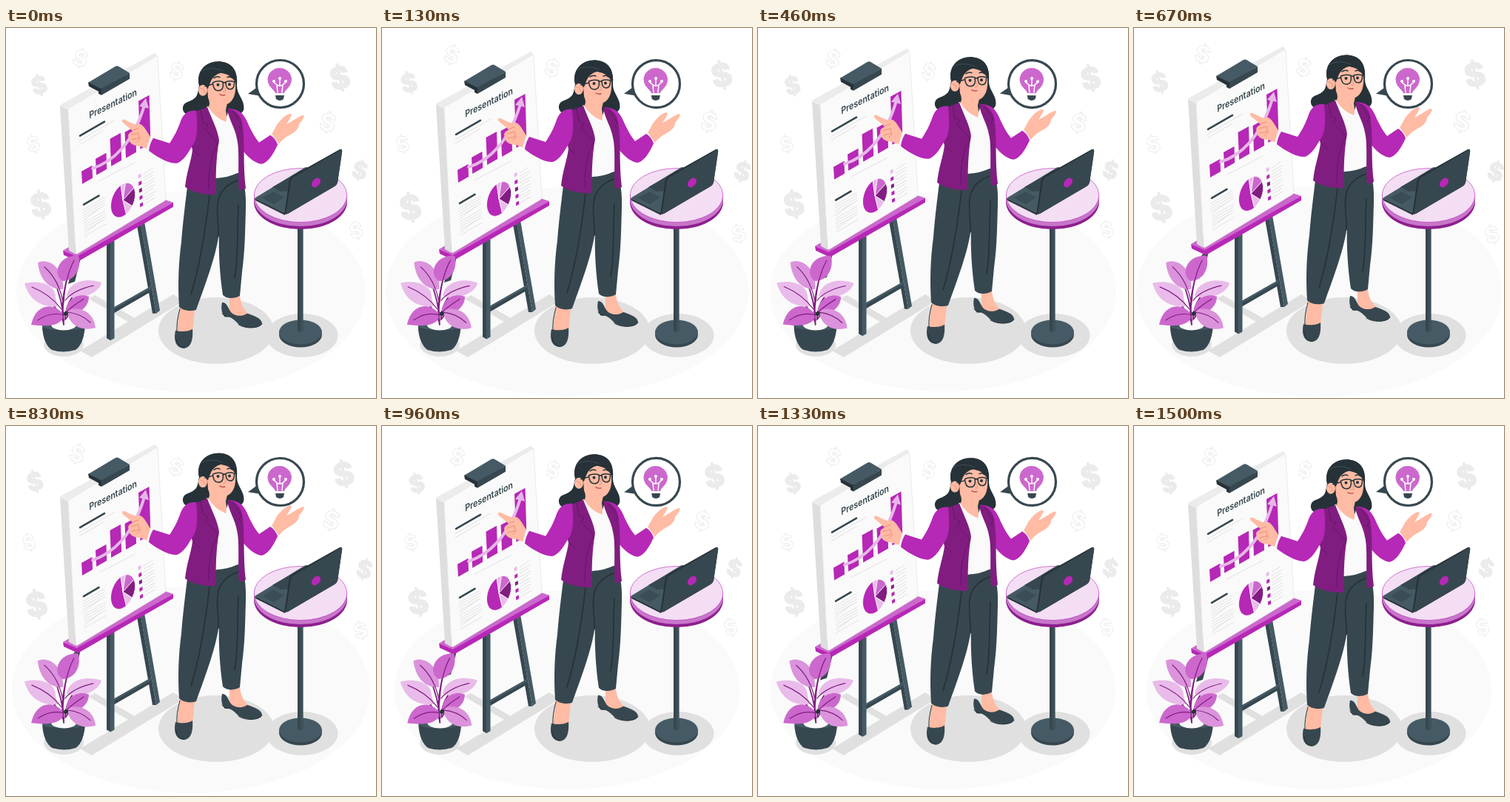
These frames come from a looping animation (500 by 500 pixels, 1540 ms). An HTML page:

```html
<!DOCTYPE html>
<html lang="en">
<head>
<meta charset="utf-8">
<title>Presentation</title>
<style>
html, body { margin: 0; height: 100%; overflow: hidden; background: #fff; }
svg { display: block; width: 500px; height: 500px; }
.p { fill: #b628b6 } .dp { fill: #811d81 } .mp { fill: #cc68cd } .lp { fill: #db93dc } .xp { fill: #e9bbea }
.d { fill: #37474f } .m { fill: #455a64 } .k { fill: #263238 } .skin { fill: #ffbba4 } .sh { fill: #e0e0e0 }
.line { fill: none; stroke-linecap: round; stroke-linejoin: round }
.vein { stroke: #811d81 }
.ink { stroke: #263238; stroke-width: 1.5 }
.fold { stroke: #5f135f; stroke-width: .8 }
.fine { stroke: #dedede; stroke-width: .9 }
#coins { font: 800 30px Inter, sans-serif; text-anchor: middle }
</style>
</head>
<body>
<svg viewBox="0 0 500 500">
  <ellipse id="floor" cx="250" cy="356.500" rx="233.500" ry="134.500" fill="#fafafa"/>
  <g id="coins"></g>

  <g id="shadows" class="sh">
    <ellipse cx="284" cy="409" rx="78" ry="45"/>
    <ellipse cx="400" cy="415.500" rx="48.500" ry="29.500"/>
    <ellipse cx="78" cy="428" rx="27" ry="16"/>
    <path d="M100 436 226 360 240 369 116 445Z"/>
    <path d="M112 366 120 361 186 399 177 404Z"/>
  </g>

  <g id="easel">
    <path class="d" d="M92 315 101 311 93 343 84 346Z"/>
    <path class="d" d="M177 267 182 264 203 386 198 386Z"/>
    <path class="m" d="M182 265 187 262 208 382 203 386Z"/>
    <path class="m" d="M145 378 196 349 197 353 145 382Z"/>
    <path class="d" d="M145 381 197 352 197 356 145 386Z"/>
    <path class="d" d="M136 288H141.500V422.500L136 419.500Z"/>
    <path class="m" d="M141 288H146.500V419.500L141 422.500Z"/>

    <path class="p" d="M77 301 97 309V316L78 307Z"/>
    <path class="mp" d="M77 301 92 292 214 232 226 236 97 310Z"/>
    <path class="p" d="M96 309 226 236V242L97 316Z"/>

    <path d="M73 107Q72 105 75 103L199 35Q203 33 204 37L206 42 84 112Z" fill="#ececec"/>
    <path d="M73 106 84 111 94 306 85 301Z" fill="#dedede"/>
    <path d="M84 113Q83 110 86 108L202 39Q205 37 205 41L216 231Q216 233 214 234L97 305Q94 307 94 303Z" fill="#fafafa" stroke="#e2e2e2" stroke-width=".7"/>

    <path class="m" d="M111 74 148 52Q150 51 152 52L167 61 129 83Z"/>
    <path class="d" d="M129 82 167 61V69L129 91Z"/>
    <path class="k" d="M111 73.500 129 82.500V91L125 89V86L112 79Z"/>

    <text transform="matrix(.81 -.405 .04 1 112.500 123)" font-family="Inter, sans-serif" font-size="13" font-weight="600" fill="#37474f">Presentation</text>
    <path class="line" d="M100 146 133 127M105 239 125.500 227" stroke="#37474f" stroke-width="2.600"/>
    <path id="rules" class="line fine"/>
    <g id="bars" class="p"></g>
    <path class="line" d="M117 190C145 181 171 156 186 108" stroke="#e7b6e8" stroke-width="4"/>
    <path d="M189 95 193 109 180 106Z" fill="#e7b6e8"/>
    <g id="pie" transform="translate(158 233) matrix(16.500 -8 0 22 0 0)" stroke="#fff" stroke-width=".035"></g>
    <g id="legend"></g>
  </g>

  <g id="woman">
    <path class="k" d="M261 78C256 54 276 43 292 46C307 48 314 61 312 78C312 91 322 96 321.500 109C320 119 308 117 302 124L262 121C254 127 246 124 245 117C238 115 237 106 242 102C249 98 257 97 259 88Z"/>
    <path class="skin" d="M235 378 255 381 252 412 231 412Z"/>
    <path class="d" d="M229 409C226 423 230 433 241 433C251 432 253 419 252 407C247 411 234 411 229 409Z"/>
    <path class="skin" d="M302 364 316 361C317 374 321 380 328 387C319 393 308 391 302 383Z"/>
    <path class="d" d="M292 371C290 380 292 387 296 391C304 389 308 395 315 401C326 408 345 406 346 399C345 392 333 388 326 386C319 391 308 390 303 383C299 376 298 371 292 371Z"/>
    <path class="line" d="M231 410Q230 398 235 380M292 386Q297 392 301 390M314 401C325 408 343 406 346 400M230 420Q232 432 241 432.500" stroke="#263238" stroke-width="1"/>
    <path class="d" d="M245 215 285 203 314 196C322 203 325 224 324 246C323 278 323 300 319 330L316 362C308 367 297 366 293 361C289 335 287 304 288 276C285 305 270 345 257 381C249 384 239 382 234 377C232 349 233 318 237 289C239 263 242 240 245 215Z"/>
    <path class="line" d="M314 206C302 210 291 218 287 232C283 250 288 266 287 282M275 226C270 270 263 318 250 360M314 240C312 280 314 310 309 338" stroke="#263238" stroke-width="1.700"/>

    <path class="skin" d="M357 147C362 140 365 130 372 124C378 118 385 114 386 118C384 123 381 127 379 130C388 126 395 120 401 118C405 118 401 125 396 130C396 137 389 142 383 145C376 149 371 153 367 160Z"/>
    <path d="M356 146 359 143 369 157 366 161Z" fill="#f3f3f3"/>
    <path class="p" d="M301 109C314 110 320 114 326 127C331 139 337 149 342 155L357 145Q364 149 367 158C361 172 353 183 345 184C332 182 319 167 312 153Z"/>
    <path d="M271 106 279 110Q287 127 297 123L301 111 313 137 315 195Q300 203 283 203L275 150Z" fill="#fafafa"/>
    <path class="skin" d="M273 94 299 102 297 111Q299 122 297 128Q283 122 273 107Q277 104 273 94Z"/>
    <path d="M272 106Q281 121 297 127L299 140 276 124Z" fill="#fafafa"/>
    <path class="dp" d="M254 114 272 107C277 121 286 137 288 152C284 174 283 201 284 225C268 226 251 222 242 215C244 195 250 181 252 165C247 149 247 129 254 114Z"/>
    <path class="dp" d="M299 109C310 110 319 118 320 134C323 160 320 185 324 217L315 220C313 194 316 165 312 150C310 136 300 122 299 109Z"/>
    <path class="line fold" d="M263 111 266 128 273 131 269 137 287 156M306 112 318 130 315 135 319 139M286 156Q273 179 274 218M254 166 261 173"/>
    <path class="skin" d="M197 150C191 142 187 132 181 130C174 132 169 128 160 124C156 123 156 127 159 129L172 140C166 141 163 146 167 150C165 156 174 160 181 160L192 164Z"/>
    <path class="line" d="M170 139 179 136M169 145 179 142 180 149 170 151M177 154 182 149" stroke="#e78f79" stroke-width="1"/>
    <path d="M195 147 199 150 194 166 190 163Z" fill="#f3f3f3"/>
    <path class="p" d="M257 112C246 111 240 116 236 126C232 138 226 149 221 156L199 149Q194 157 193 166C206 176 221 184 231 183C241 180 249 164 255 154C260 142 258 124 257 112Z"/>

    <path class="skin" d="M271 68C281 56 307 59 310 75C311 88 308 99 299 103C289 106 277 103 273 94Z"/>
    <path class="k" d="M261 78C256 55 275 43 292 46C307 48 314 60 311 77C308 68 302 63 291 61C285 62 279 66 276 74L273 82 265 80Z"/>
    <ellipse class="skin" cx="266" cy="84.500" rx="6" ry="7.500"/>
    <path class="line" d="M263 82Q268 82 268.500 88" stroke="#e78f79"/>
    <path class="line" d="M263 59Q276 51 293 58" stroke="#455a64" stroke-width=".7"/>
    <path class="line ink" d="M279.500 74Q286 71 293 73Q295 85 287 85Q280 85 279.500 74ZM297 73Q303 71 308.500 73Q309 83 303 83Q297 83 297 73ZM293 75Q295 73 297 75M279.500 76 269 79"/>
    <path class="line ink" d="M281 68Q285 65 289 67M299 67Q303 65 306 68"/>
    <g class="k"><circle cx="286.500" cy="77" r="2"/><circle cx="302" cy="76.500" r="2"/></g>
    <path class="line" d="M295 78 297 85Q296 87 293 86" stroke="#e78f79"/>
    <path class="line" d="M289 90Q292 92 296 91" stroke="#b94c4c" stroke-width="1.400"/>
  </g>

  <g id="plant">
    <path class="d" d="M49 402C49 418 55 431 62 435Q78 440 94 435C102 430 106 417 107 402Z"/>
    <ellipse class="m" cx="78" cy="402.500" rx="29" ry="6"/>
    <ellipse cx="78" cy="401" rx="17" ry="7.500" fill="#fafafa"/>
    <path class="line vein" d="M78 401C73 376 79 352 85 327M78 396Q77 370 64 338M78 398Q68 374 48 360M80 392Q82 361 108 350M80 394Q88 382 98 372" stroke-width="1.800"/>
    <path class="lp" d="M77 353C57 354 45 338 43 317C58 310 79 325 77 353Z"/>
    <path class="mp" d="M77 342C65 336 68 318 81 311Q92 306 98 308C102 324 94 341 77 342Z"/>
    <path class="xp" d="M70 376C47 378 31 367 25 345C46 340 68 347 67 365Z"/>
    <path class="xp" d="M82 362C84 345 105 336 129 344C126 359 99 369 82 362Z"/>
    <path class="mp" d="M81 384C81 366 98 357 112 363C112 377 98 389 81 384Z"/>
    <path class="mp" d="M79 389C66 369 40 372 34 401C52 403 72 405 79 389Z"/>
    <path class="lp" d="M82 381C101 376 118 383 121 405C104 410 85 404 82 381Z"/>
    <path class="line vein" d="M78 371Q80 336 92 314M77 371Q72 341 52 323M75 380Q60 360 35 350M80 368Q91 354 118 348M81 384Q92 374 105 366M79 388Q60 383 43 395M83 384Q102 386 114 398M78 400Q76 382 78 370" stroke-width="1.200"/>
    <circle class="k" cx="81" cy="386" r="3"/>
  </g>

  <g id="table">
    <ellipse class="d" cx="398" cy="414.500" rx="29" ry="17"/>
    <ellipse class="m" cx="398" cy="411" rx="29" ry="16.500"/>
    <path class="d" d="M394 264H401.500V409Q398 412 394 409Z"/>
    <path class="m" d="M398 264H401.500V409L398 410Z" opacity=".5"/>
    <path d="M335 226V235A63 37 0 0 0 461 235V226Z" fill="#8d1f8e"/>
    <path d="M335 226V231A63 37 0 0 0 461 231V226Z" fill="#c876ca"/>
    <ellipse cx="398" cy="226" rx="62.800" ry="36.500" fill="#f3def4" stroke="#b628b6" stroke-width=".6"/>
    <path class="k" d="M336 230 377 250V253L337 233Z"/>
    <path class="m" d="M336 230 403 189Q406 187 409 189L430 202 377 251Z"/>
    <path class="d" d="M360 215 404 190 412 194 384 220 371 221Z"/>
    <path class="k" d="M346 230 361 221 376 229 362 238Z" opacity=".3"/>
    <path class="k" d="M376 252 383 205Q384 202 387 200L451 164Q455 163 454 168L448 209Q447 212 444 214L381 251Z"/>
    <path class="d" d="M378 252 385 206Q386 203 388 202L452 165Q455 164 454 168L448 209Q447 212 444 214Z"/>
    <ellipse class="p" cx="419" cy="209" rx="7.200" ry="5" transform="rotate(-48 419 209)"/>
  </g>

  <g id="bubble">
    <path class="d" d="M327 89 341 79 345 92Z"/>
    <circle cx="370.500" cy="75.500" r="32" fill="#fff" stroke="#37474f" stroke-width="3.200"/>
    <path class="mp" d="M364 88C363 83 353.500 80 353.500 69A16.300 16.300 0 0 1 386 69C386 80 377 83 376 88Z"/>
    <path class="line" d="M367 87 366 77 362 73M373 87 374 77 378 73M366 77Q370 79 374 77M370 77V70" stroke="#fff" stroke-width="1.500"/>
    <g fill="#fff"><circle cx="362" cy="72" r="2"/><circle cx="370" cy="68" r="2"/><circle cx="378" cy="72" r="2"/></g>
    <path class="d" d="M364 91H376L375 96Q370 100 365 96Z"/>
  </g>
</svg>
<script>
const $ = id => document.getElementById(id);

// x, y, size, tilt, outlined
const coins = [
  [47, 78, 33, -14, 0], [49, 238, 44, -10, 0], [449, 68, 42, -12, 0], [476, 192, 32, 14, 0],
  [102, 42, 30, 14, 1], [39, 157, 27, -14, 1], [231, 59, 29, 14, 1], [433, 128, 33, 12, 1], [471, 272, 28, -14, 1]
];
$('coins').innerHTML = coins.map(([x, y, size, tilt, outlined]) =>
  `<text transform="translate(${x} ${y}) rotate(${tilt}) scale(${size / 31})" y="10.800" stroke="#ebebeb" fill="${outlined ? '#fff' : '#ebebeb'}">$</text>`).join('');

// left x, top y, bottom y
const bars = [[102, 194, 211], [121, 177, 199], [140.5, 150, 187], [160.5, 141, 176], [179, 99, 164]];
$('bars').innerHTML = bars.map(([x, top, bottom]) =>
  `<path d="M${x} ${top}l14.500-8 ${(bottom - top) * .03} ${bottom - top}-14 8Z"/>`).join('');

let rules = 'M99 153 147 125M99 158 133 138M126 207 174 182';
for (let i = 0; i < 11; i++) rules += `M${104 + i * .2} ${246 + i * 3.6}l${i % 5 == 4 ? 22 : 29}-17`;
for (let i = 0; i < 10; i++) rules += `M${186 + i * .2} ${198 + i * 4.4}l${i % 2 ? 14 : 12}-8`;
$('rules').setAttribute('d', rules);

const slices = [['p', 74, 260], ['xp', 260, 282], ['mp', 282, 335], ['dp', 335, 400], ['xp', 40, 74]];
const rim = deg => `${Math.cos(deg * Math.PI / 180)} ${Math.sin(deg * Math.PI / 180)}`;
$('pie').innerHTML = slices.map(([tone, from, to]) =>
  `<path class="${tone}" d="M0 0L${rim(from)}A1 1 0 ${+(to - from > 180)} 1 ${rim(to)}Z"/>`).join('');

$('legend').innerHTML = ['xp', 'p', 'dp', 'p', 'p'].map((tone, i) =>
  `<path class="${tone}" d="M${178.5 + i * .6} ${199 + i * 9.7}l4-2.200.3 4.800-4 2.200Z"/>`).join('');

const PERIOD = 1540, BEAT = 480;
const move = (id, transform) => $(id).setAttribute('transform', transform);
const scaleAt = (s, x, y) => `translate(${x} ${y}) scale(${s}) translate(${-x} ${-y})`;

function draw(now) {
  const t = (now + 25) % PERIOD, u = t / PERIOD;
  const lift = -10 * (1 - Math.abs(1 - 2 * u));
  const sway = u < .25 ? 4 * u : u < .75 ? 2 - 4 * u : 4 * u - 4;
  const pulse = 1 + (t < 2 * BEAT ? .06 * Math.abs(Math.sin(Math.PI * t / BEAT)) : 0);
  move('easel', `translate(0 ${lift})`);
  move('woman', `translate(0 ${lift})`);
  move('plant', `rotate(${sway} 77 372)`);
  move('bubble', `rotate(${sway} 366 75)`);
  move('floor', scaleAt(pulse, 250, 356.5));
  move('coins', scaleAt(pulse, 257, 156));
}

const start = performance.now();
function tick() {
  draw(performance.now() - start);
  requestAnimationFrame(tick);
}
tick();
</script>
</body>
</html>
```
